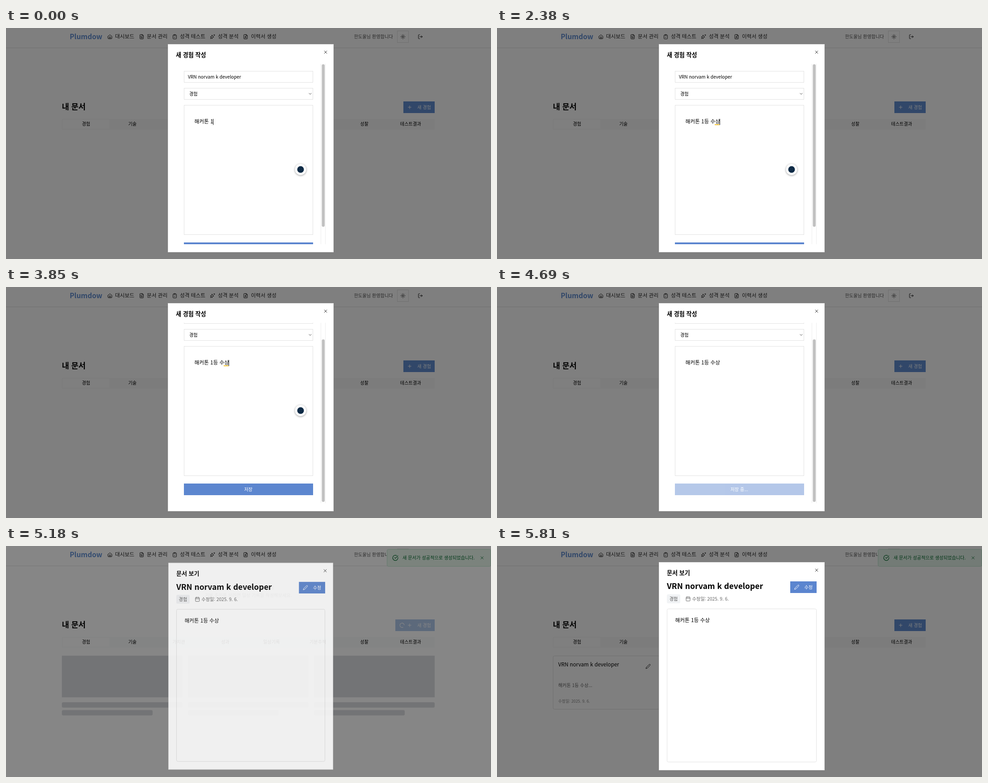
Recreate the animation shown at these times as an HTML page. Size 1085 by 516 pixels, loop 8330 ms.

```html
<!DOCTYPE html>
<html lang="ko">
<head>
<meta charset="utf-8">
<style>
  html, body { margin: 0; width: 100%; height: 100%; overflow: hidden; background: #fff; }
  svg { display: block; width: 1085px; height: 516px; }
  text { font-family: 'Noto Sans CJK KR', 'Noto Sans CJK', sans-serif; white-space: pre; }
</style>
</head>
<body>
<svg id="stage" viewBox="0 0 1085 516"></svg>
<script>
const LOOP = 8330, STEP = 70, SWAP = 5110, LOADED = 5670;
const BLUE = '#5b85cf', PAGE_BLUE = '#6290d4', LINE = '#e2e2e2', GREEN = '#006b2a';
const DOC = 'VRN norvam k developer', DATE = '수정일: 2025. 9. 6.';
const SMALL = 10.2, BASE = 11.7, LARGE = 13.1, HEAD = 17.5;

const FILE = 'M15 2H6a2 2 0 0 0-2 2v16a2 2 0 0 0 2 2h12a2 2 0 0 0 2-2V7ZM14 2v5h6';
const ICON = {
  home: 'M15 21v-8H9v8M3 10l9-7 9 7v9a2 2 0 0 1-2 2H5a2 2 0 0 1-2-2z',
  doc: FILE + 'M16 13H8M16 17H8M10 9H8',
  clip: 'M9 2h6v4H9zM16 4h2a2 2 0 0 1 2 2v14a2 2 0 0 1-2 2H6a2 2 0 0 1-2-2V6a2 2 0 0 1 2-2h2M9 14l2 2 4-4',
  spark: 'M10 5q1 7 8 8-7 1-8 8-1-7-8-8 7-1 8-8zM20 2v5M17.5 4.5h5M4 18v3M2.5 19.5h3',
  person: FILE + 'M8.5 18a3.5 3.5 0 0 1 7 0M10 12a2 2 0 1 0 4 0 2 2 0 1 0-4 0',
  sun: 'M8 12a4 4 0 1 0 8 0 4 4 0 1 0-8 0M12 2v2M12 20v2M4.9 4.9l1.4 1.4M17.7 17.7l1.4 1.4M2 12h2M20 12h2M6.3 17.7l-1.4 1.4M19.1 4.9l-1.4 1.4',
  exit: 'M9 21H5a2 2 0 0 1-2-2V5a2 2 0 0 1 2-2h4M16 17l5-5-5-5M21 12H9',
  plus: 'M5 12h14M12 5v14',
  close: 'M18 6 6 18M6 6l12 12',
  down: 'M6 9l6 6 6-6',
  pencil: 'M21.2 6.8a1 1 0 0 0-4-4L3.8 16.2 2 22l5.8-1.8z',
  calendar: 'M8 2v4M16 2v4M5 4h14a2 2 0 0 1 2 2v14a2 2 0 0 1-2 2H5a2 2 0 0 1-2-2V6a2 2 0 0 1 2-2zM3 10h18',
  check: 'M21.8 10A10 10 0 1 1 17 3.3M9 11l3 3L22 4',
  spinner: 'M21 12a9 9 0 1 1-6.2-8.6'
};

// Typed text by time; a true third item marks a syllable still being composed.
const TYPING = [
  [0, '1'], [70, '1ㄷ', true], [140, '1드', true], [350, '1등', true], [700, '1등 '],
  [840, '1등 ㅅ', true], [1050, '1등 ㅅㅅ', true], [1260, '1등 ㅅㅅㅇ', true],
  [1610, '1등 ㅅㅅ'], [1750, '1등 ㅅ'], [1890, '1등 '], [1960, '1등 ㅅ', true],
  [2100, '1등 수', true], [2170, '1등 숫', true], [2310, '1등 수사', true],
  [2380, '1등 수상', true], [4060, '1등 수상']
];

const clamp = v => Math.max(0, Math.min(1, v));
const ramp = (t, start, length) => clamp((t - start) / length);
const smooth = v => v * v * (3 - 2 * v);
const pen = document.createElement('canvas').getContext('2d');
const widthOf = str => {
  pen.font = `${BASE}px 'Noto Sans CJK KR', 'Noto Sans CJK', sans-serif`;
  return pen.measureText(str).width;
};

const text = (x, middle, size, str, attrs = '') =>
  `<text x="${x}" y="${middle + size * 0.37}" font-size="${size}" ${attrs}>${str}</text>`;
const rect = (x, y, w, h, fill, attrs = '') =>
  `<rect x="${x}" y="${y}" width="${w}" height="${h}" fill="${fill}" ${attrs}/>`;
const box = (x, y, w, h, stroke = LINE, fill = 'none', r = 0) =>
  rect(x + .5, y + .5, w - 1, h - 1, fill, `stroke="${stroke}" rx="${r}"`);
const group = (attrs, ...parts) => `<g ${attrs}>${parts.join('')}</g>`;
const icon = (name, cx, cy, color = '#111', size = BASE, turn = 0) =>
  group(`transform="translate(${cx} ${cy}) scale(${size / 24}) rotate(${turn}) translate(-12 -12)" fill="none"
    stroke="${color}" stroke-width="2" stroke-linecap="round" stroke-linejoin="round"`, `<path d="${ICON[name]}"/>`);
const shade = alpha => rect(0, 0, 1085, 516, '#000', `opacity="${alpha}"`);
const BOLD = 'font-weight="700"', MEDIUM = 'font-weight="500"', MIDDLE = 'text-anchor="middle"';

function header() {
  const links = [['home', 232.5, '대시보드', 244], ['doc', 303.5, '문서 관리', 315], ['clip', 377.5, '성격 테스트', 389],
    ['spark', 462, '성격 분석', 474], ['person', 536, '이력서 생성', 548]];
  return text(142.5, 19, 15.5, 'Plumdow', `${BOLD} fill="${PAGE_BLUE}"`) +
    links.map(([name, cx, label, x]) => icon(name, cx, 19.5) + text(x, 19, BASE, label, 'fill="#222"')).join('') +
    text(778.5, 19, SMALL, '한도울님 환영합니다', 'fill="#555"') +
    box(875, 6, 26, 27) + icon('sun', 888, 19.5) + icon('exit', 927, 19.5) + rect(0, 44, 1085, 1, LINE);
}

function newButton(t, loading) {
  const fade = t < LOADED ? 1 - .5 * ramp(t, 5080, 100) : .5 + .5 * ramp(t, LOADED, 140);
  const left = loading ? 871 : 889;
  return group(`opacity="${fade}"`,
    rect(left, 164, 959 - left, 26, PAGE_BLUE),
    loading ? icon('spinner', 886, 177, '#fff', 13, t * .36) : '',
    icon('plus', 903, 177, '#fff'),
    text(920, 177, SMALL, '새 경험', `${MEDIUM} fill="#fff"`));
}

function skeleton(t) {
  const pulse = .75 + .25 * Math.cos((t - SWAP) / 2000 * Math.PI * 2);
  return group(`opacity="${pulse}"`, ...[125, 407, 689].map(x =>
    rect(x, 245, 270, 93, '#dbdddf') + rect(x, 349, 270, 12, '#dbdddf', 'rx="3"') +
    rect(x, 366.5, 203, 12, '#dbdddf', 'rx="3"')));
}

function card() {
  return box(125, 245, 270, 120, LINE, '#fff', 3) + text(137, 265, BASE, DOC, MEDIUM) + icon('pencil', 338, 269) +
    text(137, 311, SMALL, '해커톤 1등 수상...', 'fill="#666"') + text(137, 347, 8.8, DATE, 'fill="#888"');
}

function toast() {
  return box(852, 7, 233, 39, '#bfe8cf', '#e8f7ee', 3) + icon('check', 871, 26.5, GREEN, 14) +
    text(887, 26, SMALL, '새 문서가 성공적으로 생성되었습니다.', `${MEDIUM} fill="${GREEN}"`) +
    icon('close', 1065, 26.5, GREEN, 11);
}

function page(t) {
  const loading = t >= SWAP && t < LOADED;
  const tabs = ['경험', '기술', '가치관', '성과', '일상기록', '기분추적', '성찰', '테스트결과'];
  return rect(0, 0, 1085, 516, '#fff') + header() +
    text(542, 93, BASE, '아직 기분 기록이 없어요', `${MIDDLE} fill="#999"`) +
    text(542, 110, SMALL, '기분 추이를 보려면 일상 기록을 작성해보세요.', `${MIDDLE} fill="#777"`) +
    text(125, 176, HEAD, '내 문서', BOLD) + newButton(t, loading) +
    rect(125, 203, 834, 24, '#f9fafa') + rect(127, 205, 104, 20, '#fff') +
    tabs.map((tab, i) => text(179 + i * 103.75, 214.5, SMALL, tab, `${MIDDLE} ${MEDIUM}`)).join('') +
    (loading ? skeleton(t) : t >= LOADED ? card() : '') + (t >= SWAP ? toast() : '');
}

function dialog(title, opacity, scale, ...content) {
  return group(`opacity="${opacity}" transform="translate(547.5 268.5) scale(${scale}) translate(-547.5 -268.5)"`,
    box(362, 36, 371, 465, LINE, '#fff'), text(380, 60, LARGE, title, BOLD),
    icon('close', 715, 54, '#333'), ...content);
}

function editor(t) {
  const [, tail, composing] = TYPING.findLast(([start]) => t >= start);
  const typed = '해커톤 ' + tail, left = 421.5;
  const end = left + widthOf(typed), lastStart = left + widthOf(typed.slice(0, -1));
  const caret = t < 2940 || (t >= 3500 && t < 4060);
  return box(398, 172, 289, 290) + text(left, 209, BASE, typed) +
    (composing ? rect(lastStart, 215, end - lastStart, 2, '#f2c230') : '') +
    (caret ? rect(Math.round(end), 203, 1, 13.5, '#000') : '');
}

function writeDialog(t, gone) {
  const scroll = 40 * ramp(t, 3240, 80);
  const saving = t >= 4200 && t < SWAP;
  const hover = 1 - .1 * ramp(t, 3830, 150);
  const enabled = t < SWAP ? 1 - .5 * ramp(t, 4180, 150) : 1;
  const badge = 1 - ramp(t, 4500, 180);
  return dialog('새 경험 작성', clamp(1 - 1.9 * gone), 1 - .06 * gone,
    '<clipPath id="view"><rect x="380" y="80" width="340" height="403"/></clipPath>',
    group('clip-path="url(#view)"',
      group(`transform="translate(0 ${-scroll})"`,
        box(398, 96, 289, 26), text(407, 109, SMALL, DOC),
        box(398, 134, 289, 26), text(410, 147, SMALL, '경험'), icon('down', 680.5, 147, '#222', 10),
        editor(t),
        group(`opacity="${badge}"`,
          '<circle cx="659" cy="316" r="12.5" fill="#fff" style="filter:drop-shadow(0 1px 2px #0006)"/>',
          '<circle cx="659" cy="316" r="7.5" fill="#0f2b46"/>'),
        group(`opacity="${enabled}"`, rect(398, 479, 289, 26, BLUE, `fill-opacity="${hover}"`),
          text(542, 492, SMALL, saving ? '저장 중...' : '저장', `${MIDDLE} ${MEDIUM} fill="#fff"`))),
      rect(704, 80, 1, 403, '#ececec'), rect(714, 80, 1, 403, '#ececec'),
      rect(706.5, 81 + scroll * .9, 6.5, 363, '#c1c1c1', 'rx="3.2"')));
}

function viewDialog(shown) {
  return dialog('문서 보기', shown, .95 + .05 * shown,
    text(380, 90, HEAD, DOC, BOLD),
    rect(656, 79, 59, 26, BLUE), icon('pencil', 670.5, 92, '#fff'),
    text(687.5, 92, SMALL, '수정', `${MEDIUM} fill="#fff"`),
    rect(380, 108, 30, 20, '#f1f3f5', 'rx="3"'), text(395, 118, SMALL, '경험', `${MIDDLE} fill="#555"`),
    icon('calendar', 427.5, 118, '#666'), text(436.5, 118, SMALL, DATE, 'fill="#666"'),
    box(380, 140, 335, 343, LINE, 'none', 3), text(398.5, 166, BASE, '해커톤 1등 수상'));
}

function scene(t) {
  const swap = t < SWAP ? 0 : smooth(ramp(t, 5055, 160));
  return page(t) + shade(.5 * (1 - swap)) + (swap < 1 ? writeDialog(t, swap) : '') +
    shade(.5 * swap) + (swap ? viewDialog(swap) : '');
}

const stage = document.getElementById('stage');
let shownTime = -1;
function tick() {
  const t = Math.floor(performance.now() % LOOP / STEP) * STEP;
  if (t !== shownTime) stage.innerHTML = scene(shownTime = t);
  requestAnimationFrame(tick);
}
tick();
</script>
</body>
</html>
```
